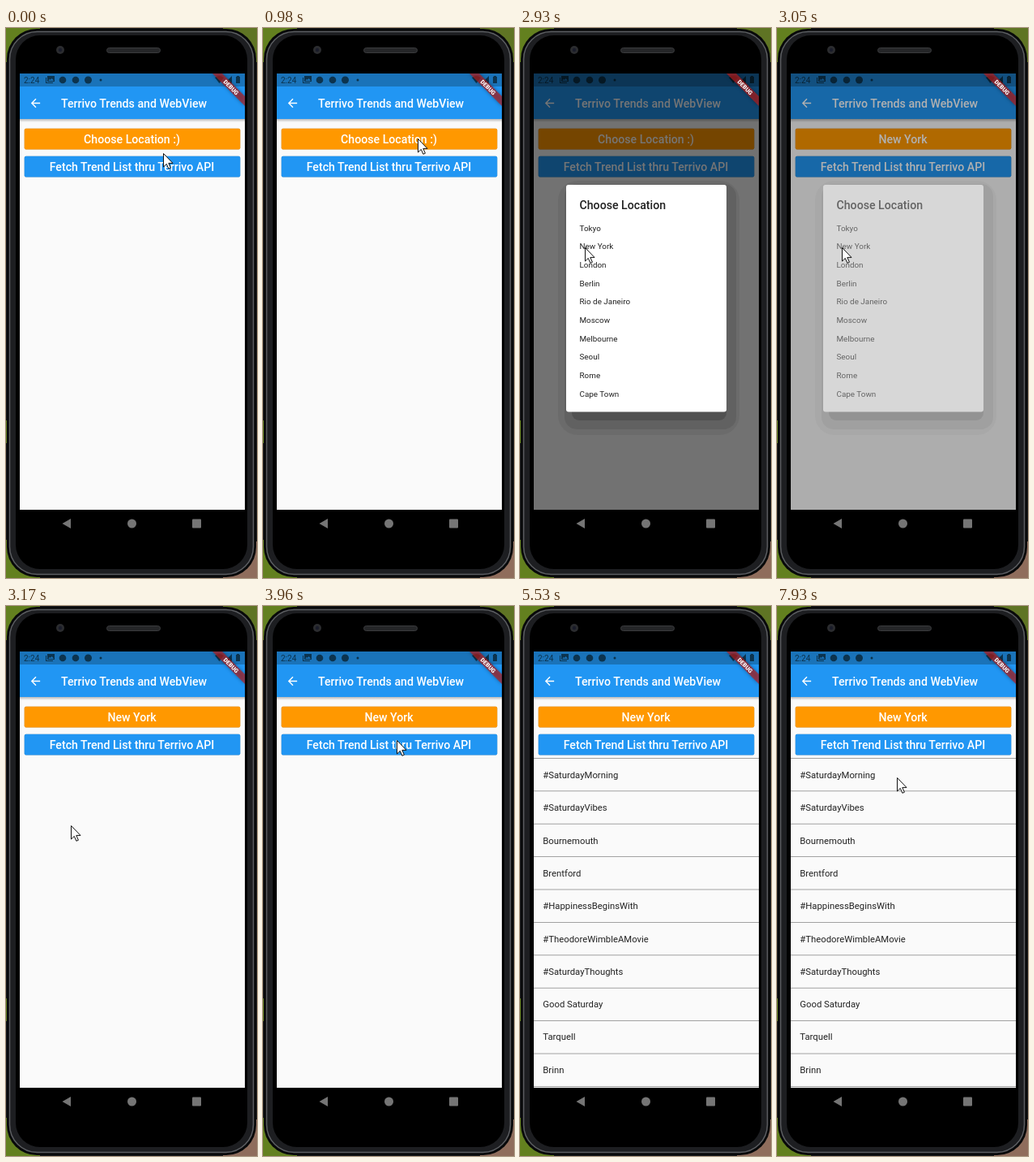
Write an HTML page that moves like this. It is 310x677 px and loops after 8 s.

```html
<!DOCTYPE html>
<html lang="en">
<head>
<meta charset="utf-8">
<title>Trends demo</title>
<style>
  html, body { margin: 0; width: 100%; height: 100%; overflow: hidden; background: #17181a; }
  svg { display: block; width: 310px; height: 677px; font-family: Roboto, sans-serif; }
  .heading { font-size: 14.15px; font-weight: 500; }
  .button { fill: #fff; text-anchor: middle; }
  .shadowed { filter: drop-shadow(0 .8px .7px #0005); }
  #banner { filter: drop-shadow(0 0 2px #0008); }
  #options { font-size: 9.9px; fill: #222; }
  #rows { font-size: 11.3px; fill: #222; }
</style>
</head>
<body>
<svg viewBox="0 0 310 677">
  <defs>
    <linearGradient id="fade" x2="0" y2="1">
      <stop stop-color="#000" stop-opacity=".26"/>
      <stop offset="1" stop-color="#000" stop-opacity="0"/>
    </linearGradient>
    <clipPath id="screenClip"><path d="M17 56H295V593H17Z"/></clipPath>
    <clipPath id="fetchClip"><rect x="22.700" y="157.700" width="266.600" height="25.700" rx="2"/></clipPath>
  </defs>

  <!-- Desktop showing around the phone -->
  <path fill="#63801f" d="M0 0H42V42H0ZM0 483H3V511H0ZM0 630H42V677H0Z"/>
  <path fill="#5f7424" d="M268 0H310V42H268Z"/>
  <path fill="#8f6d5c" d="M268 632H310V677H268Z"/>

  <!-- Phone -->
  <rect x="1" y="1" width="308" height="675" rx="37" fill="#08090a"/>
  <rect x="4.500" y="4.500" width="301" height="668" rx="34" fill="#1d1e21" stroke="#5c5e62" stroke-width="1.500"/>
  <rect x="12" y="9" width="286" height="657" rx="30"/>
  <circle cx="67" cy="27" r="5" fill="#2b2c2f"/>
  <circle cx="67" cy="27" r="2.200" fill="#1a1c2a"/>
  <rect x="124.500" y="24.500" width="66" height="6" rx="3" fill="#252628" stroke="#3a3b3d"/>
  <g fill="#757575">
    <path d="M80 604V616L69.500 610Z"/>
    <circle cx="155.500" cy="610" r="5.500"/>
    <rect x="230" y="604.500" width="11" height="11" rx="1"/>
  </g>

  <g clip-path="url(#screenClip)">
    <path fill="#fafafa" d="M17 56H295V593H17Z"/>
    <rect x="17" y="112" width="278" height="4" fill="url(#fade)"/>
    <path fill="#2196f3" d="M17 56H295V112H17Z"/>
    <path fill="#1a73b9" d="M17 56H295V72H17Z"/>

    <g fill="#0c344f">
      <text x="22" y="68" font-size="10">2:24</text>
      <path fill-rule="evenodd" d="M51 59H60V66H51ZM52 65H59L56.500 62L55 64L54 63ZM49 61H50V67H58V68H49Z"/>
      <circle cx="70" cy="64" r="4.300"/>
      <circle cx="86" cy="64" r="4.300"/>
      <circle cx="101.500" cy="64" r="4.500"/>
      <circle cx="117" cy="64" r="1.500"/>
      <path d="M258 61Q263.500 57 269 61L263.500 68ZM279 59V68H270ZM284 60H285V59H288V60H289V68H284Z"/>
    </g>

    <path fill="#fff" transform="translate(28 84) scale(.707)"
      d="M20 11H7.830l5.590-5.590L12 4l-8 8 8 8 1.410-1.410L7.830 13H20z"/>
    <text class="heading" x="68" y="98" fill="#fff">Terrivo Trends and WebView</text>

    <rect class="shadowed" x="22.700" y="123.800" width="266.600" height="25.600" rx="2" fill="#ff9800"/>
    <text id="place" class="heading button" x="155.500" y="142"></text>
    <rect class="shadowed" x="22.700" y="157.700" width="266.600" height="25.700" rx="2" fill="#2196f3"/>
    <g id="ripple" clip-path="url(#fetchClip)" fill="#fff">
      <path fill-opacity=".4" d="M22 157H290V184H22Z"/>
      <circle id="splash" cx="166" cy="166"/>
    </g>
    <text class="heading button" x="155.500" y="176">Fetch Trend List thru Terrivo API</text>

    <g id="rows"></g>

    <path id="barrier" d="M17 56H295V593H17Z"/>
    <g id="dialog">
      <rect x="47" y="188" width="224" height="313" rx="24" fill-opacity=".06"/>
      <rect x="55" y="192" width="212" height="302" rx="15" fill-opacity=".09"/>
      <rect x="64" y="198" width="191" height="285" rx="9" fill-opacity=".17"/>
      <rect x="57" y="193" width="198" height="279.500" rx="3" fill="#fff"/>
      <text class="heading" x="73.500" y="223" fill="#212121">Choose Location</text>
      <g id="options"></g>
    </g>

    <path id="banner" fill="#b71c1c" fill-opacity=".68" d="M255 56H267L295 84V96Z"/>
    <text transform="translate(278 73) rotate(45)" y="2.600" text-anchor="middle"
      font-size="7.200" font-weight="900" fill="#fff">DEBUG</text>
  </g>

  <path id="cursor" d="M.5.5V17L4.300 13.400L6.900 19.300L9.400 18.200L6.800 12.400H12Z"
    fill="#fff" stroke="#111" stroke-width="1"/>
</svg>

<script>
const LOOP = 8000;
const $ = id => document.getElementById(id);

const cities = ["Tokyo", "New York", "London", "Berlin", "Rio de Janeiro",
  "Moscow", "Melbourne", "Seoul", "Rome", "Cape Town"];
const trends = ["#SaturdayMorning", "#SaturdayVibes", "Bournemouth", "Brentford",
  "#HappinessBeginsWith", "#TheodoreWimbleAMovie", "#SaturdayThoughts",
  "Good Saturday", "Tarquell", "Brinn"];

const textAt = (x, y, label) => `<text x="${x}" y="${y}">${label}</text>`;
const divider = i => `<rect x="17" y="${187 + 40.4 * i}" width="278" height=".8" fill="#8c8c8c"/>`;

$("options").innerHTML = cities.map((c, i) => textAt(73.5, 249.5 + 22.67 * i, c)).join("");
$("rows").innerHTML = trends.map((t, i) => divider(i) + textAt(28.3, 212 + 40.3 * i, t)).join("")
  + divider(trends.length);

// Each pose holds until the next: time, x, y; no position hides the cursor.
const cursorPoses = [
  [0, 194, 154], [120, 192, 137], [980, 191, 136],
  [1500, 189, 217], [1650, 194, 335], [1770, 162, 399],
  [1920, 128, 352], [2040, 104, 313], [2160, 91, 289], [2280, 83, 275], [2400, 80, 270],
  [3570, 104, 197], [3710, 132, 183], [3835, 154, 171], [3960, 165, 165],
  [5530],
  [6340, 229, 434], [6460, 152, 360], [6580, 137, 290], [6700, 135, 242], [6820, 147, 215],
  [6970, 147, 208], [7930, 148, 211]
];

// Ripple: time, radius, opacity.
const ripplePoses = [[0, 0, 0], [4800, 45, .2], [4920, 125, .2], [5040, 200, .12], [5160, 0, 0]];

const poseAt = (poses, t) => poses.findLast(pose => pose[0] <= t);
const show = (id, visible) => $(id).setAttribute("visibility", visible ? "visible" : "hidden");

function draw(t) {
  const [, x, y] = poseAt(cursorPoses, t);
  show("cursor", x !== undefined);
  if (x !== undefined) $("cursor").setAttribute("transform", `translate(${x} ${y})`);

  const open = t >= 1230 && t < 3170;
  const closing = t >= 3050;
  show("barrier", open);
  show("dialog", open);
  $("barrier").setAttribute("fill-opacity", closing ? .31 : .54);
  $("dialog").setAttribute("opacity", closing ? .52 : 1);
  $("place").textContent = closing ? "New York" : "Choose Location :)";

  const [, radius, opacity] = poseAt(ripplePoses, t);
  $("splash").setAttribute("r", radius);
  $("ripple").setAttribute("opacity", opacity);

  show("rows", t >= 5410);
}

const start = performance.now();
function tick() {
  draw((performance.now() - start) % LOOP);
  requestAnimationFrame(tick);
}
tick();
</script>
</body>
</html>
```
